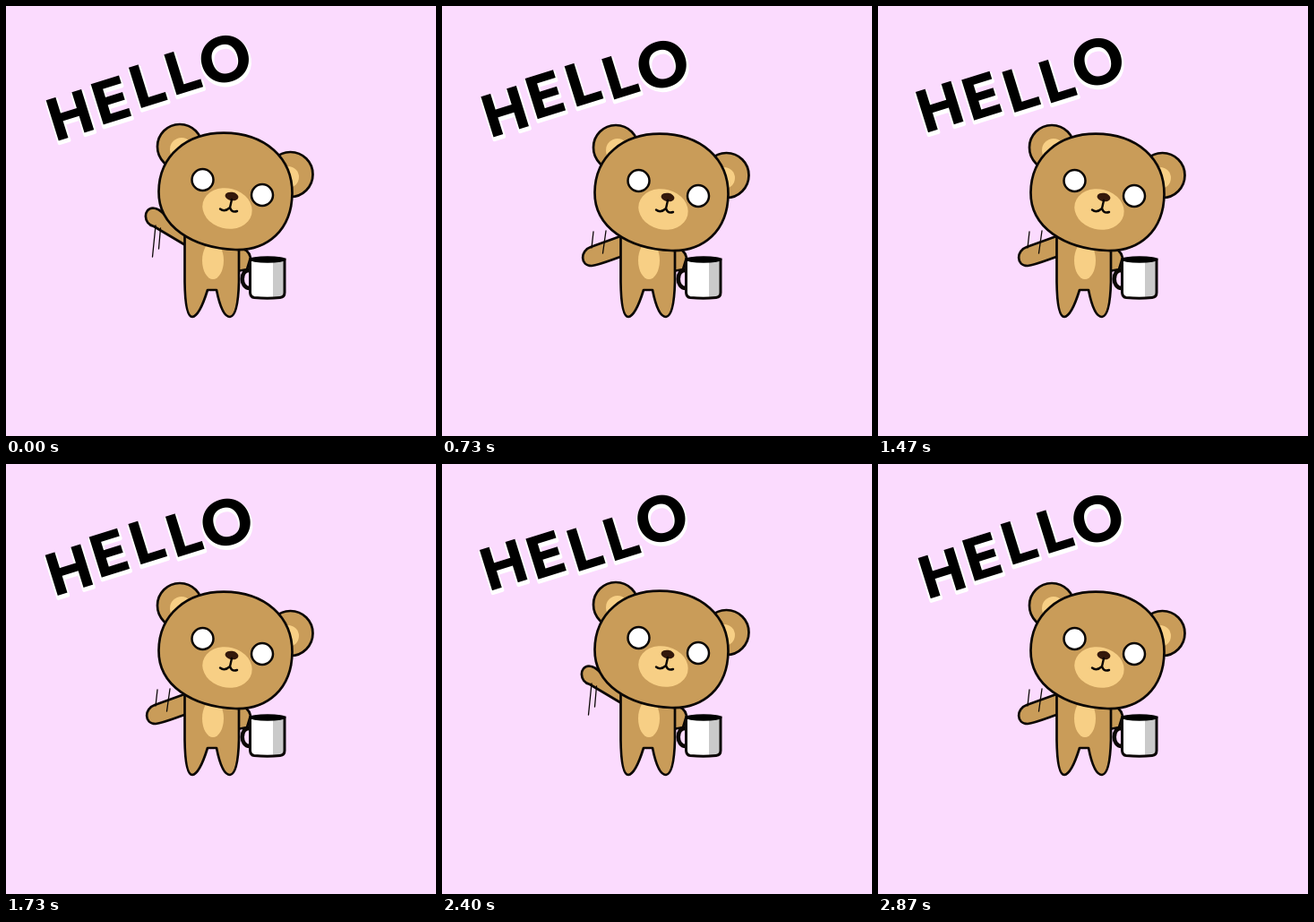
An HTML page that plays this animation: 480 by 480 pixels, repeating every 2.94 s.

```html
<!DOCTYPE html>
<html lang="en">
<head>
<meta charset="utf-8">
<title>Hello bear</title>
<style>
html, body { margin: 0; width: 100%; height: 100%; overflow: hidden; background: #fbdbfe; }
svg { display: block; width: 100%; height: 100%; }
text { font: 800 65px Inter, sans-serif; font-variation-settings: 'opsz' 14; }
.round { font: 900 70px Lato, sans-serif; text-anchor: middle; }
.halo { fill: #fff; stroke: #fff; stroke-width: 4; stroke-linejoin: round; }
.line { fill: none; stroke: #0b0705; stroke-linecap: round; }
.fur { fill: #c99c59; stroke: #0b0705; stroke-width: 2.7; stroke-linejoin: round; }
.light { fill: #f7cf85; }
.motion { stroke-width: 1.3; }
</style>
</head>
<body>
<svg viewBox="0 0 480 480">
  <g id="word" transform="translate(58.6 145.4) rotate(-17.3)"></g>

  <g id="up">
    <path class="fur" d="M202 268L165 246C153 243 153 226 164 225.500C170 225.500 174 230 178 234L202 251"/>
    <path class="line motion" d="M167 245L163.500 280M172.500 248L170.500 271"/>
  </g>
  <g id="down">
    <path class="fur" d="M202 256L166 269C154 273 154 290 167 290C176 289 190 283 202 279"/>
    <path class="line motion" d="M169 252L167 270M183 251L179.500 276"/>
  </g>

  <path class="fur" d="M257 271Q270 269 273 281L269 294L258 296"/>
  <path class="fur" d="M199.500 255V308Q200 347 208 347Q216 346 225 317H235Q241 347 250 347Q259 346 260 308V255Z"/>
  <ellipse class="light" cx="231" cy="284" rx="12" ry="21"/>

  <path class="line" stroke-width="4.500" d="M272 295C261 294 261 315 272 315"/>
  <path id="cup" fill="#fff" d="M272.500 283V320Q273 325 277 325.500Q292 327 306 325.500Q311 325 311 320V283Z"/>
  <path fill="#cacaca" d="M298 283H311V320Q311 325 306 325.500L298 326Z"/>
  <use href="#cup" style="fill-opacity:0;stroke:#0b0705;stroke-width:3"/>
  <ellipse cx="292" cy="283" rx="20.500" ry="3.800"/>

  <g id="head">
    <circle class="fur" cx="194" cy="157" r="25"/>
    <circle class="light" cx="196" cy="160" r="13"/>
    <circle class="fur" cx="317.500" cy="188" r="25"/>
    <circle class="light" cx="315" cy="191" r="12"/>
    <path class="fur" d="M170.500 207C171 166 203 141.700 243 141.700C290 142 319.500 170 319.500 209C319 250 292 273 256 272C208 270 170 246 170.500 207Z"/>
    <ellipse class="light" cx="247" cy="226" rx="28" ry="22.500" transform="rotate(14 247 226)"/>
    <ellipse fill="#34180b" cx="252" cy="212.500" rx="7.500" ry="4.700" transform="rotate(10 252 212.500)"/>
    <path class="line" stroke-width="2.400" d="M252 216L250 225Q244 230.500 239 226.500M250 225Q252 231 258 229"/>
    <g fill="#fff" stroke="#0b0705" stroke-width="2.500">
      <circle cx="219.500" cy="194" r="12"/>
      <circle cx="286" cy="211" r="12"/>
    </g>
  </g>
</svg>
<script>
const LOOP = 2940, STEPS = 44, BOUNCES = 3, WAVES = 21;
const $ = id => document.getElementById(id);
const word = $('word'), places = [-5, 48, 94, 136, 203];

function addText(char, x, y, cls) {
  const el = document.createElementNS('http://www.w3.org/2000/svg', 'text');
  el.textContent = char;
  el.setAttribute('class', char === 'O' ? cls + ' round' : cls);
  el.setAttribute('x', x);
  el.setAttribute('y', y);
  word.append(el);
  return el;
}

// All halos lie beneath the black letters.
const halos = [...'HELLO'].map((c, i) => addText(c, places[i], 3, 'halo'));
const letters = [...'HELLO'].map((c, i) => addText(c, places[i], 0, 'ink'));

function draw(now) {
  const step = Math.floor(now % LOOP * STEPS / LOOP + 0.12) % STEPS;
  const phase = step / STEPS;
  letters.forEach((letter, i) => {
    const y = -4.8 * Math.cos(2 * Math.PI * (phase * BOUNCES - 0.48 - 0.18 * i));
    const move = `translate(0 ${y.toFixed(2)})`;
    letter.setAttribute('transform', move);
    halos[i].setAttribute('transform', move);
  });
  const raised = (phase * WAVES + 0.28) % 1 < 0.5;
  $('up').style.display = raised ? '' : 'none';
  $('down').style.display = raised ? 'none' : '';
  $('head').setAttribute('transform', `translate(0 ${raised ? 0 : 1})`);
}

const start = performance.now();
function tick() {
  draw(performance.now() - start);
  requestAnimationFrame(tick);
}
tick();
</script>
</body>
</html>
```
